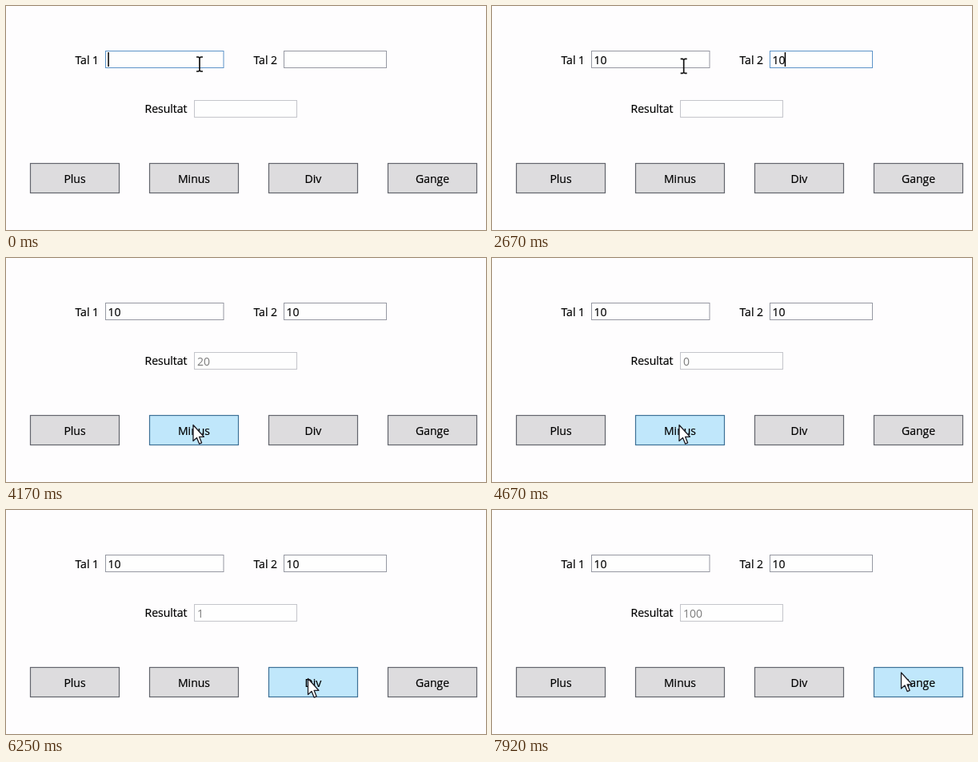
These frames come from a looping animation (600x281 px, 8000 ms). An HTML page:

```html
<!DOCTYPE html>
<html lang="da">
<head>
<meta charset="utf-8">
<style>
  html, body { margin: 0; width: 100%; height: 100%; overflow: hidden; background: #fefdfe; }
  svg { display: block; font: 14px "Open Sans", "Noto Sans", sans-serif; }
  text { stroke: #000; stroke-width: .2; }
  .box { fill: #fefefe; stroke: #9698a2; }
  .box.focus { stroke: #5c93c8; }
  .box.off { stroke: #c4c5cb; }
  .button { fill: #dddcde; stroke: #62646c; stroke-width: 1.2; }
  .button.hover { fill: #c0e7fb; stroke: #3d7096; }
  .mid { text-anchor: middle; }
  #result { fill: #7c7c7c; stroke: none; }
</style>
</head>
<body>
<svg width="600" height="281" viewBox="0 0 600 281">
  <text x="86.5" y="73">Tal 1</text>
  <text x="309.5" y="73">Tal 2</text>
  <text x="173.5" y="134">Resultat</text>
  <rect class="box" id="box1" x="124.5" y="56.5" width="147.5" height="21"/>
  <rect class="box" id="box2" x="347.5" y="56.5" width="128" height="21"/>
  <rect class="box off" x="235.5" y="118.5" width="128" height="21"/>
  <text id="num1" x="127.5" y="73"/>
  <text id="num2" x="350.5" y="73"/>
  <text id="result" x="239" y="135"/>
  <rect id="caret" y="58" width="1.5" height="18"/>
  <g id="buttons"></g>
  <path id="arrow" d="M0 0V20L4.5 16 7.6 23.6 10.6 22.3 7.6 14.8H13.4Z" fill="#fff" stroke="#1c1c24" stroke-width="1.3" stroke-linejoin="round"/>
  <path id="beam" d="M-4 -9H-1.5L0 -8 1.5 -9H4M0 -8V8M-4 9H-1.5L0 8 1.5 9H4" fill="none" stroke="#111" stroke-width="1.7"/>
</svg>
<script>
const $ = id => document.getElementById(id);
const LOOP = 8000, FPS = 12, BLINK = 530;
const TAB = 1660, MOUSE_BACK = 2330, GLIDE = 600, CLICK_DELAY = 250;
const keys1 = [750, 1000], keys2 = [2000, 2160];
const start = { x: 242, y: 73 };

// Each button with the moment and place the mouse comes to rest on it
const buttons = [
  { label: 'Plus', run: (a, b) => a + b, at: 3220, x: 108, y: 213.5 },
  { label: 'Minus', run: (a, b) => a - b, at: 4170, x: 234, y: 209.5 },
  { label: 'Div', run: (a, b) => a / b, at: 5820, x: 377.5, y: 211.5 },
  { label: 'Gange', run: (a, b) => a * b, at: 6920, x: 511.5, y: 204 }
];
const WIDTH = 111, left = i => 30.5 + 149 * i;

$('buttons').innerHTML = buttons.map(({ label }, i) =>
  `<rect class="button" x="${left(i)}" y="197.5" width="${WIDTH}" height="37"/>
   <text class="mid" x="${left(i) + WIDTH / 2}" y="222">${label}</text>`).join('');
const faces = document.querySelectorAll('.button');

function mouseAt(t) {
  let { x, y } = start;
  for (const b of buttons) {
    const k = Math.min(1, Math.max(0, 1 + (t - b.at) / GLIDE));
    const ease = k * k * (3 - 2 * k);
    x += (b.x - x) * ease;
    y += (b.y - y) * ease;
  }
  return [x, y];
}

const typed = (keys, t) => '10'.slice(0, keys.filter(k => k <= t).length);
const show = (id, on) => $(id).setAttribute('visibility', on ? 'visible' : 'hidden');

function draw(t) {
  const clicked = buttons.filter(b => b.at + CLICK_DELAY <= t);
  const first = t < TAB, second = !first && !clicked.length;
  const text1 = typed(keys1, t), text2 = typed(keys2, t);
  $('num1').textContent = text1;
  $('num2').textContent = text2;
  $('result').textContent = clicked.length ? clicked.pop().run(+text1, +text2) : '';
  $('box1').classList.toggle('focus', first);
  $('box2').classList.toggle('focus', second);

  const lastKey = Math.max(0, ...[...keys1, TAB, ...keys2].filter(k => k <= t));
  show('caret', (first || second) && (t - lastKey) % (2 * BLINK) < BLINK);
  $('caret').setAttribute('x', first ? 127.3 + text1.length * 7.7 : 350.3 + text2.length * 7.7);

  const [x, y] = mouseAt(t);
  const shown = t < keys1[0] || t >= MOUSE_BACK, overText = y < 78;
  show('beam', shown && overText);
  show('arrow', shown && !overText);
  for (const id of ['beam', 'arrow']) $(id).setAttribute('transform', `translate(${x} ${y})`);
  faces.forEach((face, i) =>
    face.classList.toggle('hover', y > 197 && x >= left(i) && x <= left(i) + WIDTH));
}

// The screen advances in steps of a twelfth of a second
function tick() {
  const t = performance.now() % LOOP;
  draw(Math.floor(t * FPS / 1000 + 0.01) * 1000 / FPS % LOOP);
  requestAnimationFrame(tick);
}
tick();
</script>
</body>
</html>
```
